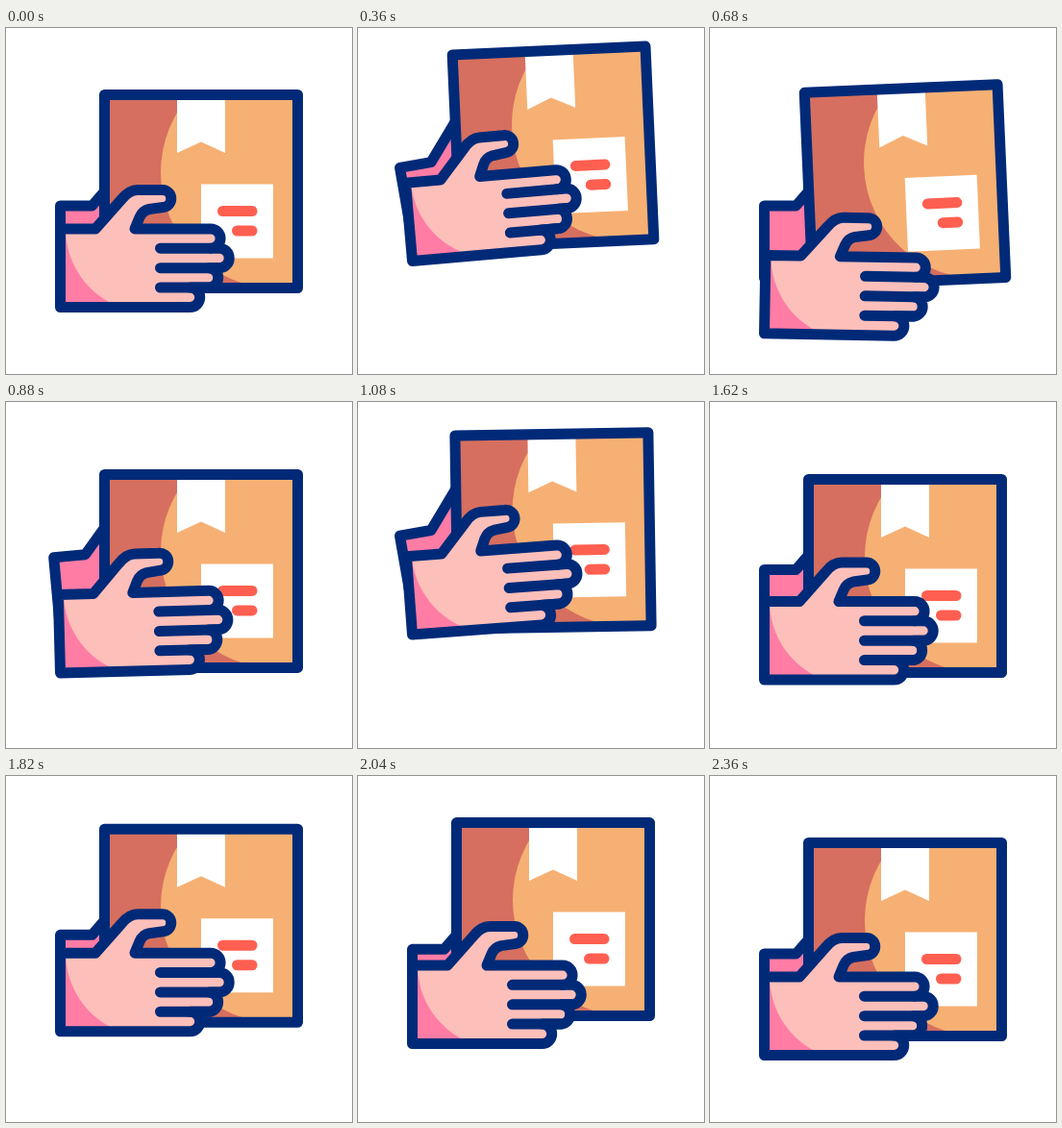
Animation of 360 by 360 pixels, one loop 2400 ms. Source, as an HTML page:

```html
<!DOCTYPE html>
<html lang="en">
<head>
<meta charset="utf-8">
<title>Handing over a parcel</title>
<style>
html, body { margin: 0; width: 100%; height: 100%; overflow: hidden; background: #fff; }
svg { display: block; width: 100%; height: 100%; }
.line { stroke: #002a78; stroke-width: 11; stroke-linecap: round; stroke-linejoin: round; }
</style>
</head>
<body>
<svg viewBox="0 0 360 360" fill="none">
  <clipPath id="inside"><path d="M102.5 69.5h201v201h-201z"/></clipPath>
  <g id="arm">
    <path class="line" fill="#ff7ca5" d="M56.5 260V185H89.500L125 144V260Z"/>
  </g>
  <g id="box">
    <path fill="#d66f5f" d="M102.5 69.5h201v201h-201z"/>
    <circle cx="282" cy="150" r="121" fill="#f6b073" clip-path="url(#inside)"/>
    <path fill="#fff" d="M178 70H228V130L203 118.500L178 130ZM203 162.500H278V239.500H203Z"/>
    <path stroke="#ff5f50" stroke-width="11" stroke-linecap="round" d="M225.500 190.500H256M240.500 211H256"/>
    <path class="line" d="M102.5 69.5h201v201h-201z"/>
  </g>
  <g id="hand">
    <path id="palm" fill="#fdbfba" d="M56.500 209H93L120 178.500Q128 168.500 137 168.500H162A9 9 0 0 1 163.500 186.500L149 188.500Q142 190 139 197L134 209H213A10.100 10.100 0 0 1 213 229.200H222A10.200 10.200 0 0 1 222 249.700H211.500A10.200 10.200 0 0 1 211.500 270H191.500A10.200 10.200 0 0 1 191.500 290.500H56.500Z"/>
    <path fill="#ff7ca5" d="M56.500 209H62A87 87 0 0 0 119 290.500H56.500Z"/>
    <use href="#palm" class="line" fill="none"/>
    <path class="line" d="M160.500 229.200H213M160.500 249.700H222M160.500 270H211.500"/>
  </g>
</svg>
<script>
const LOOP = 2400;
const byId = id => document.getElementById(id);

// The light palm is drawn once; its outline goes on top of the shade.
const palm = byId('palm');
const outline = palm.cloneNode();
outline.removeAttribute('id');
outline.setAttribute('fill', 'none');
outline.setAttribute('class', 'line');
document.querySelector('use').replaceWith(outline);

// Keys are [time, value] pairs joined by sine easing.
const parts = [
  { node: byId('arm'), pivot: '57 260',
    y: [[0, 0], [350, -41], [680, 0], [1080, -47], [1440, 0], [1790, -20], [2160, 0], [LOOP, 0]],
    turn: [[0, 0], [350, -10], [670, 0], [1080, -10], [1440, 0], [LOOP, 0]] },
  { node: byId('box'), pivot: '203 170',
    y: [[0, 0], [25, 0], [455, -52], [805, 11], [1220, -52], [1620, 11], [1938, -25], [2330, 0], [LOOP, 0]],
    turn: [[0, 0], [200, 0], [520, -5], [840, 0], [975, 0], [1285, -3.5], [1610, 0], [LOOP, 0]] },
  { node: byId('hand'), pivot: '57 290',
    y: [[0, 0], [345, -48.5], [690, 27.5], [1085, -48.5], [1475, 11], [1840, -25], [2230, 0], [LOOP, 0]],
    turn: [[0, 0], [345, -5], [690, 1], [1085, -4.3], [1475, 0.5], [1600, 0], [LOOP, 0]] }
];

function valueAt(keys, time) {
  const next = keys.findIndex(key => key[0] > time);
  const [t0, v0] = keys[next - 1];
  const [t1, v1] = keys[next];
  return v0 + (v1 - v0) * (1 - Math.cos(Math.PI * (time - t0) / (t1 - t0))) / 2;
}

function draw() {
  const time = performance.now() % LOOP;
  for (const { node, pivot, y, turn } of parts) {
    node.setAttribute('transform',
      `translate(0 ${valueAt(y, time)}) rotate(${valueAt(turn, time)} ${pivot})`);
  }
  requestAnimationFrame(draw);
}
draw();
</script>
</body>
</html>
```
